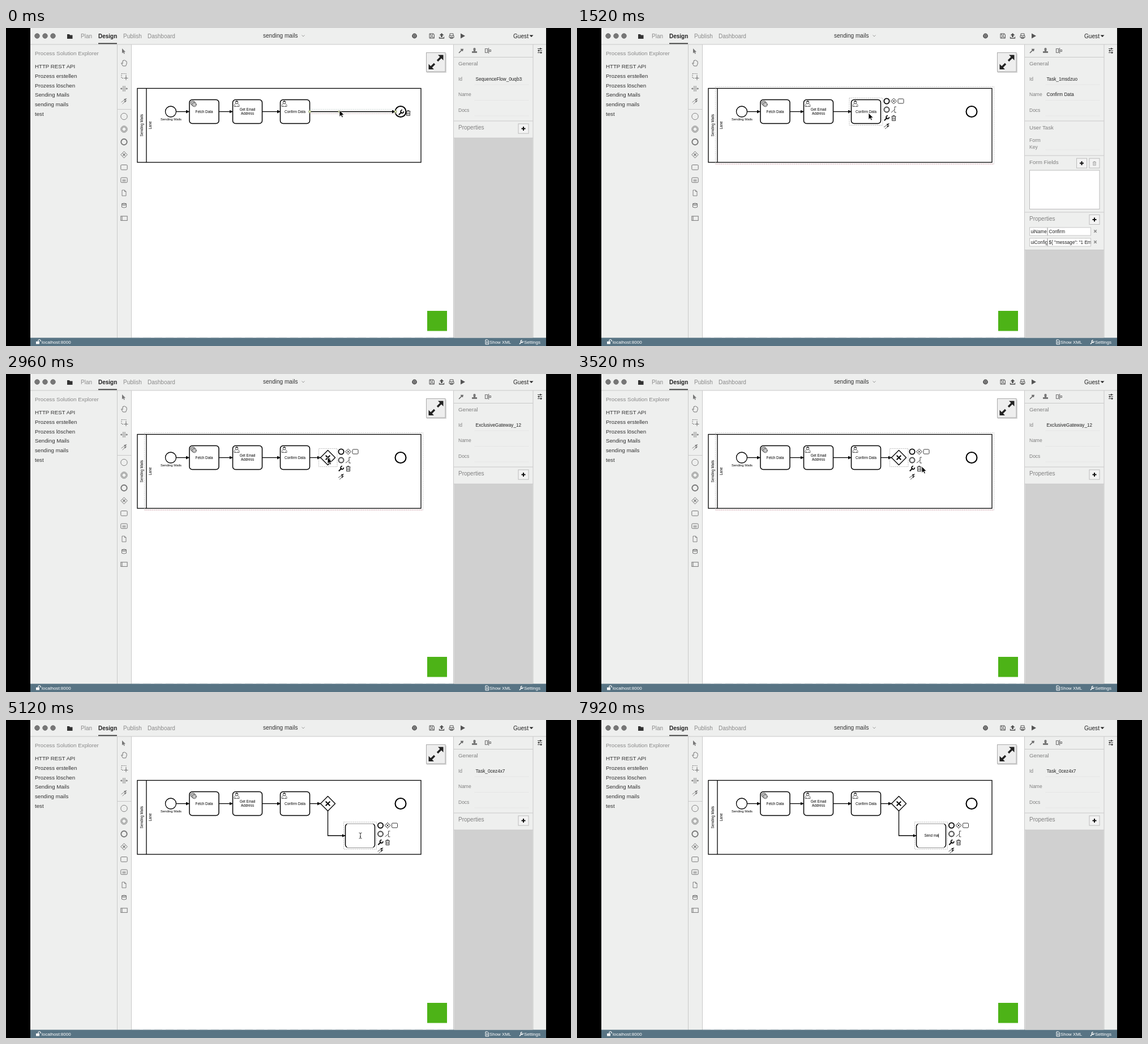
An HTML page that plays this animation: 998 by 561 pixels, repeating every 8000 ms.

```html
<!DOCTYPE html>
<html lang="en">
<head>
<meta charset="utf-8">
<title>Process designer</title>
<style>
html, body { margin: 0; width: 100%; height: 100%; overflow: hidden; background: #000; }
svg { display: block; font-family: "Liberation Sans", Arial, sans-serif; }
</style>
</head>
<body>
<svg id="stage" width="998" height="561" viewBox="0 0 998 561">
  <defs>
    <marker id="head" markerUnits="userSpaceOnUse" markerWidth="7" markerHeight="7" refX="6" refY="3" orient="auto">
      <path d="M0 0L6 3L0 6z"/>
    </marker>
  </defs>
  <g id="base"></g>
  <g id="live"></g>
</svg>
<script>
const LOOP = 8000;
const $ = id => document.getElementById(id);

// Drawing helpers
const rect = (x, y, w, h, fill, more = '') => `<rect x="${x}" y="${y}" width="${w}" height="${h}" fill="${fill}" ${more}/>`;
const box = (x, y, w, h, stroke, more = '') => rect(x, y, w, h, 'none', `stroke="${stroke}" ${more}`);
const path = (d, color = '#000', width = 1, more = '') => `<path d="${d}" fill="none" stroke="${color}" stroke-width="${width}" ${more}/>`;
const solid = (d, fill = '#000', more = '') => `<path d="${d}" fill="${fill}" ${more}/>`;
const ring = (x, y, r, width = 1, color = '#000', fill = 'none') =>
  `<circle cx="${x}" cy="${y}" r="${r}" fill="${fill}" stroke="${color}" stroke-width="${width}"/>`;
const at = (x, y, body, more = '') => `<g transform="translate(${x} ${y}) ${more}">${body}</g>`;
const text = (x, y, str, size, fill = '#222', more = '') =>
  `<text x="${x}" y="${y + size * 0.35}" font-size="${size}" fill="${fill}" ${more}>${str}</text>`;
const label = (x, y, str, size = 6.3) => text(x, y, str, size, '#000', 'text-anchor="middle"');
const flow = d => path(d, '#000', 1.3, 'marker-end="url(#head)"');
const dashed = (x, y, w, h, color = '#aaa') => box(x, y, w, h, color, 'stroke-width=".8" stroke-dasharray="2 1.3"');

// Icons, all centred on 0,0
const wrench = path('M-4.2 4.2L1-1', '#111', 2) + path('M4.3-2A2.7 2.7 0 1 1 2-4.3', '#111', 1.7);
const trash = path('M-4-3H4M-1.5-3V-4.5H1.5V-3M-3-3V4.5H3V-3M-1.2-1V3M1.2-1V3', '#333', 1);
const connect = color => path('M-5 2L2-3M-3 5L3 0', color, .8) + solid('M5-5L-.5-3.5L2-.7zM5-1.5L0 0L2 2.2z', color);
const diamond = (r, color, width) => path(`M0 ${-r}L${r} 0L0 ${r}L${-r} 0z`, color, width, 'stroke-linejoin="round"');
const cross = (r, color, width) => path(`M${-r} ${-r}L${r} ${r}M${-r} ${r}L${r} ${-r}`, color, width);
const user = path('M-4.5 5V2.5Q-4 .8-1.8 0H1.8Q4 .8 4.5 2.5V5zM-2.2 5V3M2.2 5V3', '#333', .7) + ring(0, -2.3, 2.4, .7, '#333') +
  solid('M-2.4-2.5Q-2-5.4 0-5.2Q2.4-5.2 2.4-2.5Q0-4-2.4-2.5z', '#333');
const gear = (x, y, r) => `<circle cx="${x}" cy="${y}" r="${r}" fill="#fff" stroke="#333" stroke-width="1.6" stroke-dasharray="1.2 .8"/>` + ring(x, y, r - 1.8, .6, '#333');
const gears = gear(-1, -1, 3.7) + gear(1.5, 1.5, 3.5);
const folded = path('M-3.5-5H1L3.5-2.5V5H-3.5zM1-5V-2.5H3.5', '#777', .9);
const arrowTip = 'M0 0V11.5L2.7 9L4.5 13L6.4 12.1L4.6 8.3H8.2z';

function contextPad(x, y) {
  return ring(x, y, 4.6, 1.8) +
    at(x + 12.5, y, diamond(5, '#222', .9) + cross(1.8, '#222', 1)) +
    box(x + 20, y - 4, 10, 8, '#222', 'rx="1.5" stroke-width=".9"') +
    ring(x, y + 15, 4.6, 1.6, '#333') + ring(x, y + 15, 3, .5, '#999') +
    path(`M${x + 17} ${y + 10}H${x + 14}V${y + 20}H${x + 17}M${x + 14} ${y + 15}L${x + 8} ${y + 20}`, '#333', .9, 'stroke-dasharray="9 .6"') +
    at(x, y + 30, wrench) + at(x + 12.5, y + 30, trash) + at(x, y + 44, connect('#222'));
}

const task = (x, y, lines, icon = '') =>
  rect(x, y, 52, 42, '#fff', 'stroke="#000" stroke-width="1.5" rx="5"') +
  lines.map((s, i) => label(x + 26, y + 21 + (i - (lines.length - 1) / 2) * 7, s)).join('') +
  at(x + 7, y + 7, icon);

const gateway = at(568.5, 147.5, diamond(13, '#000', 1.4) + cross(3.8, '#000', 2));

function drawBase() {
  const line = '#c9c9c9', ink = '#555';
  let s = rect(43, 0, 911, 561, '#eeefee') + rect(221, 29, 569, 518, '#fff') +
    path('M43 29H954M196.5 29V547M221.5 29V547M790.5 29V547M931 29V547M197 143.5H221', line) +
    path('M222 545.5H790', '#eee', 1, 'stroke-dasharray="14 6"');

  // Header
  for (const x of [55, 69, 83]) s += ring(x, 14, 4.2, 1, '#6c6c6c', '#777');
  s += solid('M108 11H112L113 12.5H117.5V19H108z', '#333');
  s += text(132, 14, 'Plan', 10, '#8a8a8a') + text(163, 14, 'Design', 10, '#222', 'font-weight="bold"') +
    text(207, 14, 'Publish', 10, '#8a8a8a') + text(250, 14, 'Dashboard', 10, '#8a8a8a') +
    rect(163, 26.5, 33, 1.7, '#333') + text(454, 13.5, 'sending mails', 10.05, '#333') +
    path('M522.5 12.5L525 15L527.5 12.5', '#999') +
    text(896, 14, 'Guest', 10.1) + solid('M924.5 12.5H931.5L928 16z', '#222');
  s += ring(721.5, 14, 3.4, 2, ink) + path('M719 14H724M721.5 11.5V16.5', ink, 1.5) +
    path('M748 10H755L756.5 11.5V18H748zM750 10V13H754V10M750 18V15.5H754.5V18', ink) +
    solid('M769.5 9L773.5 13H771V16H768V13H765.5z', ink) + path('M765.5 15.5V18H773.5V15.5', ink, 1.3) +
    path('M784 13V10H790V13M783 17V13.5H791V17zM785 16H789V18.5H785z', ink) +
    solid('M803 9.5L811 14L803 18.5z', ink);

  // Explorer
  s += text(51, 45, 'Process Solution Explorer', 9.8, '#888');
  ['HTTP REST API', 'Prozess erstellen', 'Prozess löschen', 'Sending Mails', 'sending mails', 'test']
    .forEach((name, i) => s += text(51, 67.5 + i * 16.85, name, 9.7, '#333'));

  // Palette
  const c = '#777', X = 208.5;
  s += at(205, 36, solid(arrowTip, c), 'scale(.75)') +
    at(X, 62, path('M-2 5L-5 0Q-4-1.5-2.5 1V-4Q-1.5-5.5-.7-4V-5Q.5-6.2 1.2-4.7Q2.7-5.5 3-3.5Q4.7-4 4.7-2V1L3 5z', c)) +
    at(X, 85, box(-4.5, -4.5, 8, 8, c, 'stroke-dasharray="2 1.5"') + path('M3.5 0V7M0 3.5H7', c)) +
    at(X, 107, path('M-1.5-5V5M1.5-5V5M-6 0H-3M3 0H6', c) + solid('M-6.5 0L-4-2V2zM6.5 0L4-2V2z', c)) +
    at(X, 129, connect(c)) + ring(X, 156, 5.7, .9, c) + ring(X, 178.5, 5.6, 1, c) + ring(X, 178.5, 3.8, 1, c) +
    ring(X, 201, 5.2, 1.9, c) + at(X, 223.5, diamond(5.8, c, 1) + cross(2, c, 1.2)) +
    box(X - 5.7, 241.5, 11.4, 8.6, c, 'rx="1.5"') + box(X - 5.7, 264, 11.4, 8.6, c, 'rx="1.5"') +
    path(`M${X - 3} 270H${X + 3}M${X - 3} 268H${X + 3}`, c) + at(X, 291, folded) +
    path(`M${X - 4} 310V316Q${X} 318 ${X + 4} 316V310Q${X} 308 ${X - 4} 310Q${X} 312 ${X + 4} 310M${X - 4} 312Q${X} 314 ${X + 4} 312`, c) +
    box(X - 5.7, 332, 11.4, 7.6, c) + path(`M${X - 3.5} 332V339.5`, c);

  // Zoom button and green mark
  s += rect(743, 45, 35, 34, '#d8d8d8') + rect(742.5, 43.5, 33.5, 33.5, '#eee', 'stroke="#aaa"') +
    path('M751 69L757 63M762 58L768 52', '#222', 3.4) +
    solid('M772.5 47.5V57L763 47.5zM746.5 73V63.5L756 73z', '#222') + rect(744, 499, 35, 35.5, '#4db317');

  // Status bar
  s += rect(43, 546.5, 911, 14.5, '#587484') + rect(53, 553, 6, 4.5, '#fff') + path('M57 553V551Q59 548 61 551V553', '#fff', 1.2) +
    text(63, 554, 'localhost:8000', 8, '#fff') + text(854, 554, 'Show XML', 7.9, '#fff') + text(915, 554, 'Settings', 8, '#fff') +
    path('M847 550H850.5L852.5 552V558H847zM848.5 553.5H851M848.5 555.5H851', '#fff') +
    at(910, 554, path('M-3 3.5L1-.5', '#fff', 1.6) + path('M3.3-1.5A2 2 0 1 1 1.5-3.3', '#fff', 1.4));

  // Side tabs
  s += path('M800 44L805 39', '#666', 1.6) + path('M803.5 37L807 40.5M805.5 39L807.5 37', '#666', 2) +
    solid('M826 41L825.5 38Q825 35 827.5 35Q830 35 829.5 38L829 41H832V44H823V41z', '#777') +
    path('M846.5 36.5H850.5V43.5H846.5zM852.5 35V45', '#777', 1.2) + box(854, 38.5, 2.5, 3, '#777') +
    path('M939 36.5H947M939 40H947M939 43.5H947', '#444', 1) + path('M944 35V38M941 38.5V41.5M945 42V45', '#444', 1.8);

  // Pool
  s += rect(232, 106.5, 501, 130.5, '#fff', 'stroke="#000" stroke-width="1.3"') + path('M248 106.5V237', '#000', 1.3) +
    at(239.5, 171.5, label(0, 0, 'Sending Mails', 6.3), 'rotate(-90)') + at(255, 171.5, label(0, 0, 'Lane', 6.3), 'rotate(-90)') +
    ring(291, 147.5, 9.5, 1.3) + label(291.5, 161, 'Sending Mails', 5.9) + ring(697, 147.5, 9.5, 2.1) +
    flow('M301 147.5H324') + flow('M376 147.5H400.5') + flow('M453 147.5H485') +
    task(324, 126.5, ['Fetch Data'], gears) + task(400.5, 126.5, ['Get Email', 'Address'], user) + task(484.5, 126.5, ['Confirm Data'], user);
  return s;
}

// Property panel
const clipped = (x, y, w, h, str) =>
  `<svg x="${x}" y="${y}" width="${w}" height="${h}" overflow="hidden">${text(2, h / 2, str, 8.2)}</svg>`;
const input = (x, y, w, str) => rect(x, y, w, 14, '#fff', 'stroke="#bbb" stroke-width=".8"') + clipped(x, y, w, 14, str);
const button = (x, y, on = true) =>
  rect(x - 9, y - 8.5, 18, 17, '#f3f3f3', 'stroke="#bbb"') + (on ? path(`M${x - 3.5} ${y}H${x + 3.5}M${x} ${y - 3.5}V${y + 3.5}`, '#111', 2) : '');
const divider = y => path(`M791 ${y}H931`, '#c9c9c9');
const underline = y => path(`M828 ${y}H923`, '#ddd', 1, 'stroke-dasharray="1 1"');

function panel(id, name, isTask) {
  const end = isTask ? 391.5 : 194, grey = '#808080';
  let s = rect(791.5, end, 139, 546.5 - end, '#d0d0d0') + divider(51.5) + divider(164) + divider(end) +
    text(799, 63, 'General', 9.7, grey) + clipped(827.5, 83, 84, 14, id) + clipped(827.5, 110.5, 84, 14, name);
  ['Id', 'Name', 'Docs'].forEach((k, i) => s += text(799, 90 + i * 27.5, k, 8.5, grey) + underline(100 + i * 27.5));
  const py = isTask ? 336 : 175.5;
  s += text(799, py, 'Properties', 10, grey) + button(914, py + 2);
  if (!isTask) return s;
  s += text(799, 175.5, 'User Task', 9.7, grey) + text(799, 198, 'Form', 8.5, grey) + text(799, 210, 'Key', 8.5, grey) +
    underline(215) + divider(225) + text(799, 237, 'Form Fields', 9.8, grey) + button(891.5, 238.5) + button(914, 238.5, false) +
    at(914, 239, trash, 'scale(.75)" opacity=".45') + rect(799.5, 251, 123.5, 68.5, '#fff', 'stroke="#bbb"') + divider(325);
  [['uiName', 'Confirm'], ['uiConfig', '${ "message": "1 Email"']].forEach(([k, v], i) => {
    const y = 352 + i * 19;
    s += input(799.5, y, 31, k) + input(831.5, y, 76, v) + at(915.5, y + 6.5, cross(2.2, '#888', 1.5));
  });
  return s;
}

// Pointer: time, x, y
const route = [
  [0, 589, 145], [350, 589, 145], [960, 583, 154], [1450, 515, 150], [1750, 515, 150], [2250, 560, 130],
  [2400, 561, 137], [2780, 568, 147], [2980, 568, 147], [3520, 609, 163], [3850, 617, 137], [3950, 617, 137],
  [4400, 626, 204], [5300, 626, 204], [6100, 641, 216], [8000, 641, 216]
];

function pointerAt(t) {
  const i = route.findIndex(p => p[0] > t), [t0, x0, y0] = route[i - 1], [t1, x1, y1] = route[i];
  const u = (t - t0) / (t1 - t0), k = u * u * (3 - 2 * u);
  return [x0 + (x1 - x0) * k, y0 + (y1 - y0) * k];
}

const hand = solid('M-2 5L-4.5 1Q-4-1-2 1V-3.5Q-1-4.7 0-3.5Q1-4 1.7-3Q3-3.5 3.4-2Q4.7-2 4.5 0L3.2 5z', '#fff', 'stroke="#111"') +
  path('M0-3V0M1.7-2.5V0', '#111', .8);
const beam = path('M-2.5-5Q0-5 0-3.5Q0-5 2.5-5M0-4V4M-2.5 5Q0 5 0 3.5Q0 5 2.5 5M-1 1.5H1', '#222', .9);
const arrow = solid(arrowTip, '#000', 'stroke="#fff" stroke-width=".8"');

function drawLive(t) {
  const within = (a, b) => t >= a && t < b;
  const [x, y] = pointerAt(t);
  const taskPlaced = t >= 4440;
  let s = t < 1520 ? panel('SequenceFlow_0uqb3x', '') :
    t < 2860 ? panel('Task_1msdzuo', 'Confirm Data', true) :
    t < 4440 ? panel('ExclusiveGateway_12', '') : panel('Task_0cez4x7', '');

  if (t < 640) {
    s += dashed(537, 143.5, 153, 7.5, '#c5d0cc') + path('M537 151H690', '#e8b8c0', .7, 'stroke-dasharray="2 1.3"') +
      flow('M537 147.5H688');
    for (const px of [536.5, 589, 688]) s += ring(px, 147.5, 2, .8, '#8a9a5a', '#dfe6c0');
    s += ring(698, 149, 5, 0, 'none', '#fff') + at(698, 149, wrench) + at(710.5, 150, trash);
  }
  if (within(640, 4440)) {
    s += dashed(244.5, 103.5, 492, 136.5, '#bbb') + path('M245 240H736', '#eaa9b5', .8, 'stroke-dasharray="2 1.3"');
  }
  if (within(1520, 2300)) s += dashed(481, 123.5, 59, 48) + contextPad(547, 129);
  if (within(2300, 2860)) s += at(x, y, diamond(13, '#7d7d4c', 1.2) + cross(4, '#ccc', 2));
  if (t >= 2860) s += flow('M537 147.5H556') + gateway;
  if (within(2860, 3950)) s += dashed(552.5, 131.5, 32.5, 32) + contextPad(592, 137);
  if (within(3950, 4440)) s += box(x - 26, y - 21, 52, 42, '#7d7d4c', 'rx="5" stroke-width="1.2"');

  if (taskPlaced) {
    s += flow('M568.5 160.5V204H599.5') + dashed(596.5, 180, 58, 48) + task(599.5, 183, []) +
      rect(602.5, 181.8, 46, 44.4, '#fff') + path('M602 183H649M602 225.5H649', '#777', .8) + contextPad(661.5, 186);
    const typed = 'Send ma'.slice(0, Math.max(0, Math.floor((t - 6980) / 130) + 1));
    s += label(626, 204, typed);
    const widths = [0, 2.1, 3.9, 5.6, 7.4, 8.2, 10.9, 12.6];
    if (typed || (t - 4500) % 1060 < 530) s += path(`M${626 + widths[typed.length]} 200.5V207.5`, '#222', .8);
  }

  if (t < 6980) {
    s += within(2300, 2860) || within(3950, 4440) ? at(x, y + 4, hand) :
      within(4440, 5700) ? at(x, y, beam) : at(x, y, arrow);
  }
  return s;
}

$('base').innerHTML = drawBase();
let start;
function tick(now) {
  start ??= now;
  $('live').innerHTML = drawLive((now - start) % LOOP);
  requestAnimationFrame(tick);
}
$('live').innerHTML = drawLive(0);
requestAnimationFrame(tick);
</script>
</body>
</html>
```
